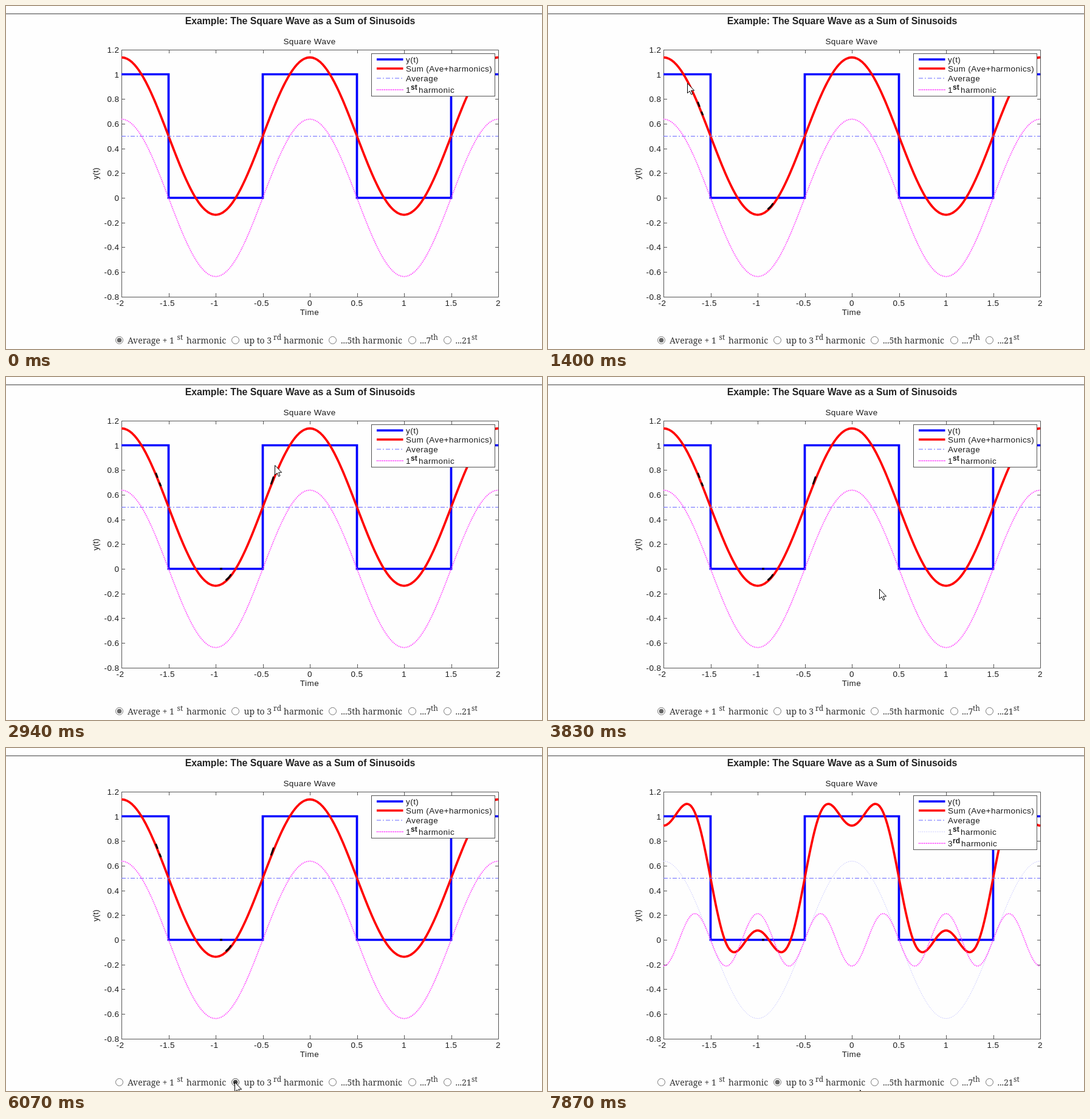
Write an HTML page that moves like this. It is 882 px wide and 565 px high and loops after 8 s.

```html
<!DOCTYPE html>
<html lang="en">
<head>
<meta charset="utf-8">
<title>Square wave harmonics</title>
<style>
  html, body { margin: 0; width: 100%; height: 100%; overflow: hidden; background: #fefefe; }
  svg { display: block; }
  .plot text { font: 13.5px "Liberation Sans", Arial, sans-serif; letter-spacing: .45px; fill: #1c1c1c; }
  .plot .sup { font-size: 12px; font-weight: bold; letter-spacing: 0; }
  .heading { font: bold 15.8px "Liberation Sans", Arial, sans-serif; fill: #222; }
  .options text { font: 14px "Noto Serif", serif; fill: #333; }
  .options .sup { font-size: 12px; }
</style>
</head>
<body>
<svg id="stage" width="882" height="565" viewBox="0 0 882 565"></svg>
<script>
const LOOP = 8000, STEP = 70;
const stage = document.getElementById('stage');

function add(parent, tag, attrs = {}, text) {
  const node = document.createElementNS('http://www.w3.org/2000/svg', tag);
  for (const name in attrs) node.setAttribute(name, attrs[name]);
  if (text !== undefined) node.textContent = text;
  parent.append(node);
  return node;
}
const label = (parent, x, y, text, attrs) => add(parent, 'text', { x, y, ...attrs }, text);
const show = (node, visible) => node.setAttribute('visibility', visible ? 'visible' : 'hidden');

// Plot coordinates
const px = t => 500 + 155 * t;
const py = v => 316 - 203.5 * v;
const harmonic = n => t =>
  2 / (Math.PI * n) * (n % 4 === 1 ? 1 : -1) * Math.cos(n * Math.PI * t);
const first = harmonic(1), third = harmonic(3);

function curve(f) {
  let d = '';
  for (let i = 0; i <= 310; i++) {
    const t = -2 + i * 4 / 310;
    d += (i ? 'L' : 'M') + px(t).toFixed(2) + ' ' + py(f(t)).toFixed(2);
  }
  return d;
}

const styles = {
  square: { stroke: '#00f', 'stroke-width': 3.7 },
  sum: { stroke: '#f00', 'stroke-width': 3.7, 'stroke-linejoin': 'round' },
  average: { stroke: '#6868ff', 'stroke-width': 1, 'stroke-dasharray': '7 3 2 3' },
  faint: { stroke: '#a8a8ff', 'stroke-width': 1, 'stroke-dasharray': '1 2' },
  bold: { stroke: '#ff38ff', 'stroke-width': 1.8, 'stroke-dasharray': '1.5 1.5' }
};
const stroke = (parent, d, style) => add(parent, 'path', { d, fill: 'none', ...styles[style] });

add(stage, 'rect', { width: 882, height: 565, fill: '#fefefe' });
add(stage, 'rect', { y: 12, width: 882, height: 1.6, fill: '#808080' });
label(stage, 484, 30, 'Example: The Square Wave as a Sum of Sinusoids',
  { class: 'heading', 'text-anchor': 'middle' });

const plot = add(stage, 'g', { class: 'plot' });

function drawAxes() {
  let d = 'M190.5 72.5H810.5V479.5H190.5Z';
  for (let i = 0; i <= 8; i++) {
    const t = -2 + i / 2, x = Math.round(px(t)) + .5;
    d += `M${x} 479V473M${x} 73V78`;
    label(plot, px(t) - (t < 0 ? 2 : 0), 494, t, { 'text-anchor': 'middle' });
  }
  for (let i = 0; i <= 10; i++) {
    const v = (i - 4) / 5, y = Math.round(py(v)) + .5;
    d += `M190 ${y}H196M810 ${y}H805`;
    label(plot, 186.5, py(v) + 5, v, { 'text-anchor': 'end' });
  }
  add(plot, 'path', { d, fill: 'none', stroke: '#555' });
  label(plot, 499.5, 63, 'Square Wave', { 'text-anchor': 'middle' });
  label(plot, 499.5, 508.5, 'Time', { 'text-anchor': 'middle' });
  label(plot, 0, 0, 'y(t)',
    { 'text-anchor': 'middle', transform: 'translate(152 276) rotate(-90)', style: 'letter-spacing:0' });
}

function drawLegend(parent, harmonics) {
  add(parent, 'rect', { x: 601.5, y: 78.5, width: 203, height: harmonics.length > 1 ? 89 : 70,
    fill: '#fff', stroke: '#555' });
  const row = (y, style, text) => {
    stroke(parent, `M610 ${y}H653.5`, style);
    label(parent, 658, y + 5, text);
  };
  row(88, 'square', 'y(t)');
  row(103, 'sum', 'Sum (Ave+harmonics)');
  row(119, 'average', 'Average');
  harmonics.forEach(([digit, suffix, style], i) => {
    const y = 138 + 19 * i;
    row(y, style, digit);
    label(parent, 666, y, suffix, { class: 'sup' });
    label(parent, 679 + i, y + 5, 'harmonic');
  });
}

function drawChart(sum, harmonics) {
  const g = add(plot, 'g');
  const hi = py(1), lo = py(0);
  stroke(g, `M190 ${hi}H267.5V${lo}H422.5V${hi}H577.5V${lo}H732.5V${hi}H810`, 'square');
  stroke(g, curve(sum), 'sum');
  stroke(g, 'M190 214.5H810', 'average');
  for (const [, , style, f] of harmonics) stroke(g, curve(f), style);
  drawLegend(g, harmonics);
  return g;
}

drawAxes();
const charts = [
  drawChart(t => .5 + first(t), [['1', 'st', 'bold', first]]),
  drawChart(t => .5 + first(t) + third(t), [['1', 'st', 'faint', first], ['3', 'rd', 'bold', third]])
];

// Dark traces the pointer leaves on the lines: path, from, until
const traces = [
  ['M361.5 335Q367 331 370.5 325', 1120, 6280],
  ['M246.5 158L249.5 166M252.5 174L255 180', 1400, 6280],
  ['M352 316H356', 1960, LOOP],
  ['M436 177L440.5 164', 2810, 6280]
].map(([d, from, until]) => ({
  node: add(stage, 'path', { d, fill: 'none', stroke: '#100', 'stroke-width': 3 }), from, until
}));

// Radio buttons
const options = add(stage, 'g', { class: 'options' });
const radios = [186.5, 377.5, 537.5, 668.5, 726.5].map(cx => ({
  ring: add(options, 'circle', { cx, cy: 550.5, r: 6, fill: '#fff', stroke: '#767676' }),
  dot: add(options, 'circle', { cx, cy: 550.5, r: 3.8, fill: '#666' })
}));
[[200, 'Average + 1'], [297, 'harmonic'], [391.5, 'up to 3'], [457, 'harmonic'],
 [551, '...5th harmonic'], [681, '...7'], [739.5, '...21']]
  .forEach(([x, text]) => label(options, x, 556, text));
[[281.5, 'st'], [440, 'rd'], [699, 'th'], [766, 'st']]
  .forEach(([x, text]) => label(options, x, 550, text, { class: 'sup' }));

// Pointer
const arrow = add(stage, 'path', {
  d: 'M.5 .5V16.5L4.2 13.1L6.6 18.7L9 17.7L6.6 12.2H11.6Z', fill: '#fff', stroke: '#000'
});
const beam = add(stage, 'path', {
  d: 'M-3.5 -7.5H-1L0 -6.5L1 -7.5H3.5M0 -6.5V6.5M-3.5 7.5H-1L0 6.5L1 7.5H3.5',
  fill: 'none', stroke: '#000', 'stroke-width': 1.3
});

// Each move: start time, then [step, x, y] stops
const moves = [
  [500, [1, 711, 509], [2, 600, 440], [3, 500, 385], [4, 425, 348], [5, 380, 326], [6, 361, 319]],
  [1120, [0, 361, 319], [2, 315, 258], [4, 246, 157], [5, 229, 127], [7, 212, 90], [9, 255, 180], [12, 345, 300]],
  [1960, [0, 345, 300], [2, 331, 333], [3, 352, 343], [6, 437, 276], [9, 443, 205], [12, 432, 163]],
  [2810, [0, 430, 165], [2, 442, 145], [4, 475, 160], [7, 535, 245], [10, 570, 328]],
  [3830, [0, 570, 328], [1, 545, 349], [3, 425, 425], [5, 345, 477]],
  [4370, [0, 343, 477], [3, 372, 524], [5, 391, 546], [7, 388, 554], [12, 376, 550]],
  [7590, [0, 376, 550], [1, 390, 552], [3, 450, 559], [5, 513, 563]]
];

function pointerAt(time) {
  const move = moves.filter(([start]) => time >= start).pop();
  if (!move) return null;
  const [start, ...stops] = move;
  const last = stops[stops.length - 1];
  const step = Math.min(Math.floor((time - start) / STEP) + 1, last[0]);
  const i = stops.findIndex(stop => stop[0] >= step);
  const b = stops[i], a = stops[i - 1] || b;
  const k = b === a ? 1 : (step - a[0]) / (b[0] - a[0]);
  return [1, 2].map(axis => Math.round(a[axis] + (b[axis] - a[axis]) * k));
}

function render(time) {
  const updated = time >= 6280;
  show(charts[0], !updated);
  show(charts[1], updated);
  traces.forEach(({ node, from, until }) => show(node, time >= from && time < until));

  const chosen = time >= 6070 ? 1 : 0;
  const hovered = time >= 5000 && time < 7590;
  radios.forEach(({ dot }, i) => show(dot, i === chosen));
  radios[1].ring.setAttribute('stroke', hovered ? '#4f4f4f' : '#767676');
  radios[1].ring.setAttribute('fill', time >= 6000 && time < 6070 ? '#ddd' : '#fff');
  radios[1].dot.setAttribute('fill', hovered ? '#444' : '#666');

  const at = pointerAt(time);
  const overText = at && at[0] > 386 && at[1] > 538 && time < 5140;
  show(arrow, at && !overText);
  show(beam, overText);
  if (at) {
    arrow.setAttribute('transform', `translate(${at})`);
    beam.setAttribute('transform', `translate(${at[0] + .5} ${at[1]})`);
  }
}

const begin = performance.now();
function tick(now) {
  render(Math.max(0, now - begin) % LOOP);
  requestAnimationFrame(tick);
}
render(0);
requestAnimationFrame(tick);
</script>
</body>
</html>
```
